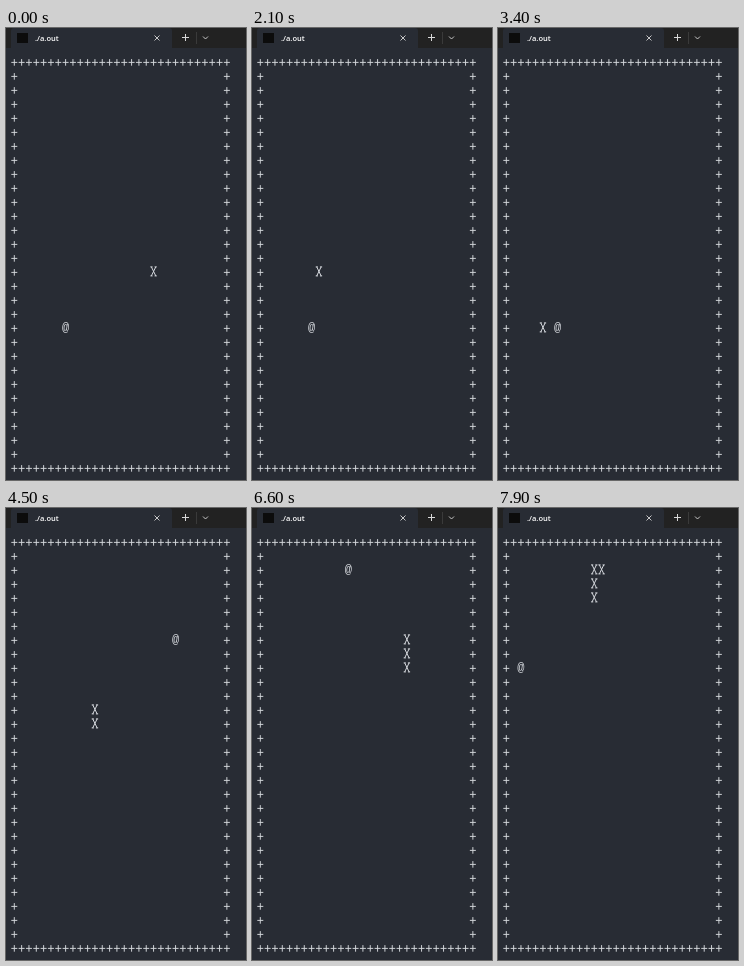
Write an HTML page with a canvas that moves like this. It is 240 px wide and 452 px high and loops after 8000 ms.

```html
<!DOCTYPE html>
<html lang="en">
<head>
<meta charset="utf-8">
<title>Snake in a terminal</title>
<style>
  html, body { margin: 0; width: 100%; height: 100%; overflow: hidden; background: #282c34; }
  canvas { display: block; }
</style>
</head>
<body>
<canvas id="stage" width="240" height="452"></canvas>
<script>
const ctx = document.getElementById('stage').getContext('2d');

const LOOP = 8000, FRAME = 100;
const TICK = 87.2, DELAY = 27;      // one cell per game tick
const SIZE = 30;                    // the board is SIZE x SIZE characters
const BACK = '#282c34', BAR = '#222222', INK = '#d5d8dd';

const colX = col => 8.3 + col * 7.33;
const rowY = row => 34.4 + row * 14;

// Corners of the snake's route, as [column, row]
const corners = [
  [19, 15], [20, 15], [20, 20], [8, 20], [8, 11], [5, 11], [5, 19], [11, 19],
  [11, 7], [22, 7], [22, 10], [20, 10], [20, 2], [12, 2], [12, 4]
];
const foods = [[7, 19], [22, 7], [12, 2], [2, 9]];

const route = [corners[0]];
for (const [col, row] of corners.slice(1)) {
  let [c, r] = route[route.length - 1];
  while (c !== col || r !== row) {
    c += Math.sign(col - c);
    r += Math.sign(row - r);
    route.push([c, r]);
  }
}

// The route step at which each food is reached
let searchFrom = 0;
const mealSteps = foods.slice(0, -1).map(([col, row]) =>
  searchFrom = route.findIndex(([c, r], i) => i >= searchFrom && c === col && r === row));

function strokeLines(lines, color, width = 1) {
  ctx.strokeStyle = color;
  ctx.lineWidth = width;
  ctx.beginPath();
  for (const [x1, y1, x2, y2] of lines) {
    ctx.moveTo(x1, y1);
    ctx.lineTo(x2, y2);
  }
  ctx.stroke();
}

function drawPlus(col, row) {
  const x = colX(col), y = rowY(row);
  strokeLines([[x - 3, y, x + 3, y], [x, y - 3.3, x, y + 3.3]], INK, 0.95);
}

function drawSegment([col, row]) {
  const x = colX(col), y = rowY(row) - 1;
  strokeLines([
    [x - 2.2, y - 4.5, x + 2.2, y + 4.5], [x + 2.2, y - 4.5, x - 2.2, y + 4.5],
    [x - 3.2, y - 4.5, x - 1, y - 4.5], [x + 1, y - 4.5, x + 3.2, y - 4.5],
    [x - 3.2, y + 4.5, x - 1, y + 4.5], [x + 1, y + 4.5, x + 3.2, y + 4.5]
  ], INK);
}

function drawFood([col, row]) {
  ctx.font = '12px "Liberation Mono", monospace';
  ctx.textAlign = 'center';
  ctx.fillStyle = INK;
  const box = ctx.measureText('@');
  const middle = (box.actualBoundingBoxAscent - box.actualBoundingBoxDescent) / 2;
  ctx.fillText('@', colX(col), rowY(row) - 1 + middle);
}

function drawTitleBar() {
  ctx.fillStyle = BAR;
  ctx.fillRect(0, 0, 240, 20);
  ctx.fillStyle = BACK;
  ctx.beginPath();
  ctx.roundRect(5, 0, 161, 20, [3, 3, 0, 0]);
  ctx.fill();

  ctx.fillStyle = '#0c0c0c';
  ctx.fillRect(11, 5, 11, 10);

  ctx.font = '600 7.5px "Open Sans", sans-serif';
  ctx.textAlign = 'left';
  ctx.fillStyle = '#ffffff';
  ctx.fillText('./a.out', 29, 13);

  strokeLines([[148.5, 7.5, 153.5, 12.5], [153.5, 7.5, 148.5, 12.5]], '#d8d8d8', 0.9);
  strokeLines([[176, 9.5, 183, 9.5], [179.5, 6, 179.5, 13]], '#d8d8d8');
  strokeLines([[190.5, 4, 190.5, 16]], '#3a3a3a');
  strokeLines([[197, 8.5, 199.5, 11], [199.5, 11, 202, 8.5]], '#d8d8d8', 0.9);
}

function draw(time) {
  ctx.fillStyle = BACK;
  ctx.fillRect(0, 0, 240, 452);
  drawTitleBar();

  for (let i = 0; i < SIZE; i++) {
    drawPlus(i, 0);
    drawPlus(i, SIZE - 1);
    if (i > 0 && i < SIZE - 1) {
      drawPlus(0, i);
      drawPlus(SIZE - 1, i);
    }
  }

  const shown = Math.floor(time / FRAME) * FRAME;
  const head = Math.max(0, Math.min(route.length - 1, Math.floor((shown - DELAY) / TICK)));
  const eaten = mealSteps.filter(step => step <= head).length;
  drawFood(foods[eaten]);
  route.slice(Math.max(0, head - eaten), head + 1).forEach(drawSegment);
}

function play(now) {
  draw(now % LOOP);
  requestAnimationFrame(play);
}
requestAnimationFrame(play);
</script>
</body>
</html>
```
